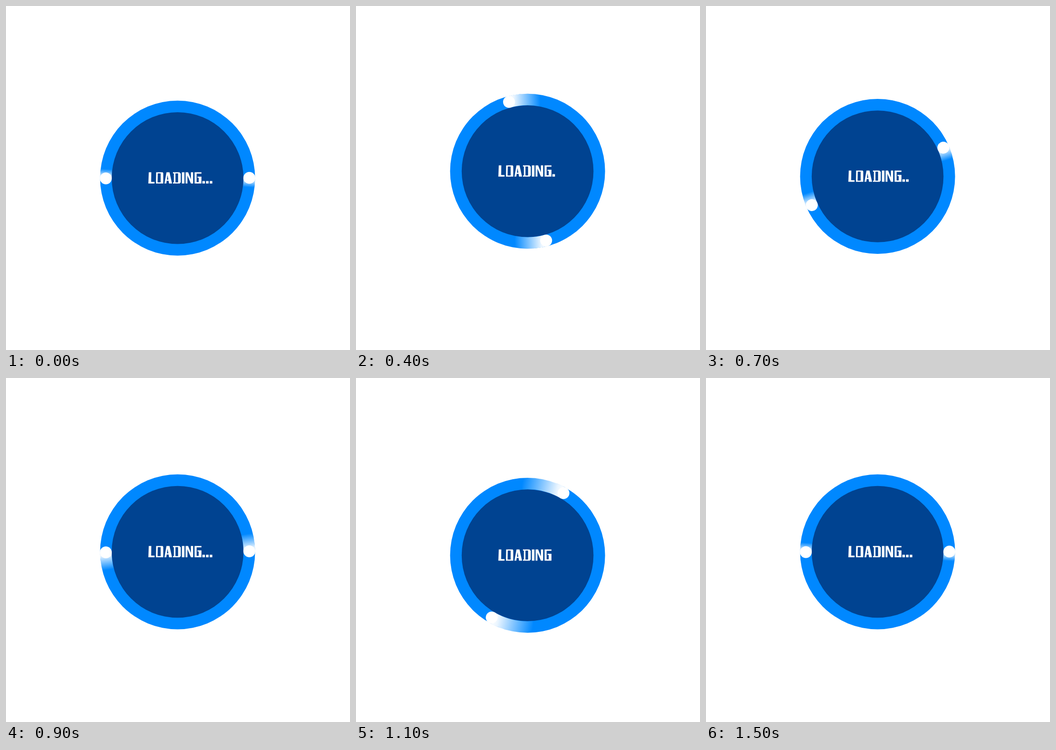
Write an HTML page that moves like this. It is 748 px wide and 748 px high and loops after 1.6 s.

```html
<!DOCTYPE html>
<html lang="en">
<head>
<meta charset="utf-8">
<title>Loading</title>
<style>
  html, body { margin: 0; width: 100%; height: 100%; overflow: hidden; background: #fff; }
  svg { display: block; width: 100%; height: 100%; }
  text { font: 700 24px "Liberation Sans", sans-serif; fill: transparent; }
</style>
</head>
<body>
<svg viewBox="0 0 748 748">
  <defs>
    <linearGradient id="fade" gradientUnits="userSpaceOnUse" x1="156" y1="0">
      <stop offset="0" stop-color="#fff"/>
      <stop offset="0.16" stop-color="#fff" stop-opacity="0.92"/>
      <stop offset="1" stop-color="#fff" stop-opacity="0"/>
    </linearGradient>
  </defs>
  <g id="badge">
    <circle r="168.5" fill="#0088ff"/>
    <circle r="143.3" fill="#004391"/>
    <g id="orbit">
      <g id="comet">
        <path id="trail" fill="none" stroke="url(#fade)" stroke-width="25.2"/>
        <circle cx="156" r="12.9" fill="#fff"/>
      </g>
      <use href="#comet" transform="rotate(180)"/>
    </g>
    <text id="label" x="-64" y="12"></text>
    <g transform="translate(-373.1 -12.7)" fill="#fff">
      <path fill-rule="evenodd" d="
        M310.5 0H316L315.6 21H323V24.5H309.5Z
        M326.5 0H340.5L342 2V24.5H326Z M330 2.5H336.3V22H329.6Z
        M349 0H355.5L361 24.5H354.5L353.5 18.5H349.5L348.5 24.5H344.5Z M351.2 6L353 16H350Z
        M363 0H377L380 3V22L377.5 24.5H363V22H365V2.5H363Z M368.5 2.5H374.2V22H368.5Z
        M382.5 0H388V24.5H382.5Z
        M390.5 0H396L402 15V0H407V24.5H402L394.5 7V24.5H390.5Z
        M410 0H425V3H414.5V21.5H419V12H416.5V9.5H425V24.5H410Z"/>
      <g id="dots">
        <rect x="427" y="19" width="5.6" height="5.5"/>
        <rect x="435" y="19" width="5.6" height="5.5"/>
        <rect x="443" y="19" width="5.6" height="5.5"/>
      </g>
    </g>
  </g>
</svg>
<script>
const STEP = 100, STEPS = 16, RADIUS = 156;

// Counter-clockwise swing, then a faster swing back, in degrees per step.
const angles = [0.2, 4, 19.3, 57, 105, 152.6, 184, 203.6, 207, 180.4, 125, 60, 19, 3, 0, 0.2];
// Steps at which the number of dots becomes 0, 1, 2, 3.
const dotSteps = [[2, 0], [4, 1], [6, 2], [8, 3], [10, 0], [12, 1], [13, 2], [15, 3]];

const $ = id => document.getElementById(id);
const set = (id, attrs) => {
  for (const key in attrs) $(id).setAttribute(key, attrs[key]);
};
const dots = [...$("dots").children];

function bob(step) {
  const p = (step + 4) % STEPS;
  return 374.25 + 3.75 * (Math.abs(p - 8) - 4);
}

function dotCount(step) {
  let count = 3;
  for (const [start, n] of dotSteps) if (step >= start) count = n;
  return count;
}

function drawTrail(speed) {
  const ccw = speed >= 0;
  const size = Math.max(7.5, Math.abs(speed) * 0.53) * Math.PI / 180;
  const end = ccw ? size : -size;
  const x = RADIUS * Math.cos(end), y = RADIUS * Math.sin(end);
  set("fade", { x2: x, y2: y });
  set("trail", { d: `M${RADIUS} 0A${RADIUS} ${RADIUS} 0 0 ${ccw ? 1 : 0} ${x} ${y}` });
}

function draw(time) {
  const step = Math.floor(time / STEP) % STEPS;
  const angle = angles[step];
  const count = dotCount(step);
  set("badge", { transform: `translate(373.1 ${bob(step)})` });
  set("orbit", { transform: `rotate(${-angle})` });
  drawTrail(angle - angles[(step + STEPS - 1) % STEPS]);
  dots.forEach((dot, i) => dot.setAttribute("visibility", i < count ? "visible" : "hidden"));
  $("label").textContent = "LOADING" + ".".repeat(count);
}

function tick() {
  draw(performance.now());
  requestAnimationFrame(tick);
}
tick();
</script>
</body>
</html>
```
